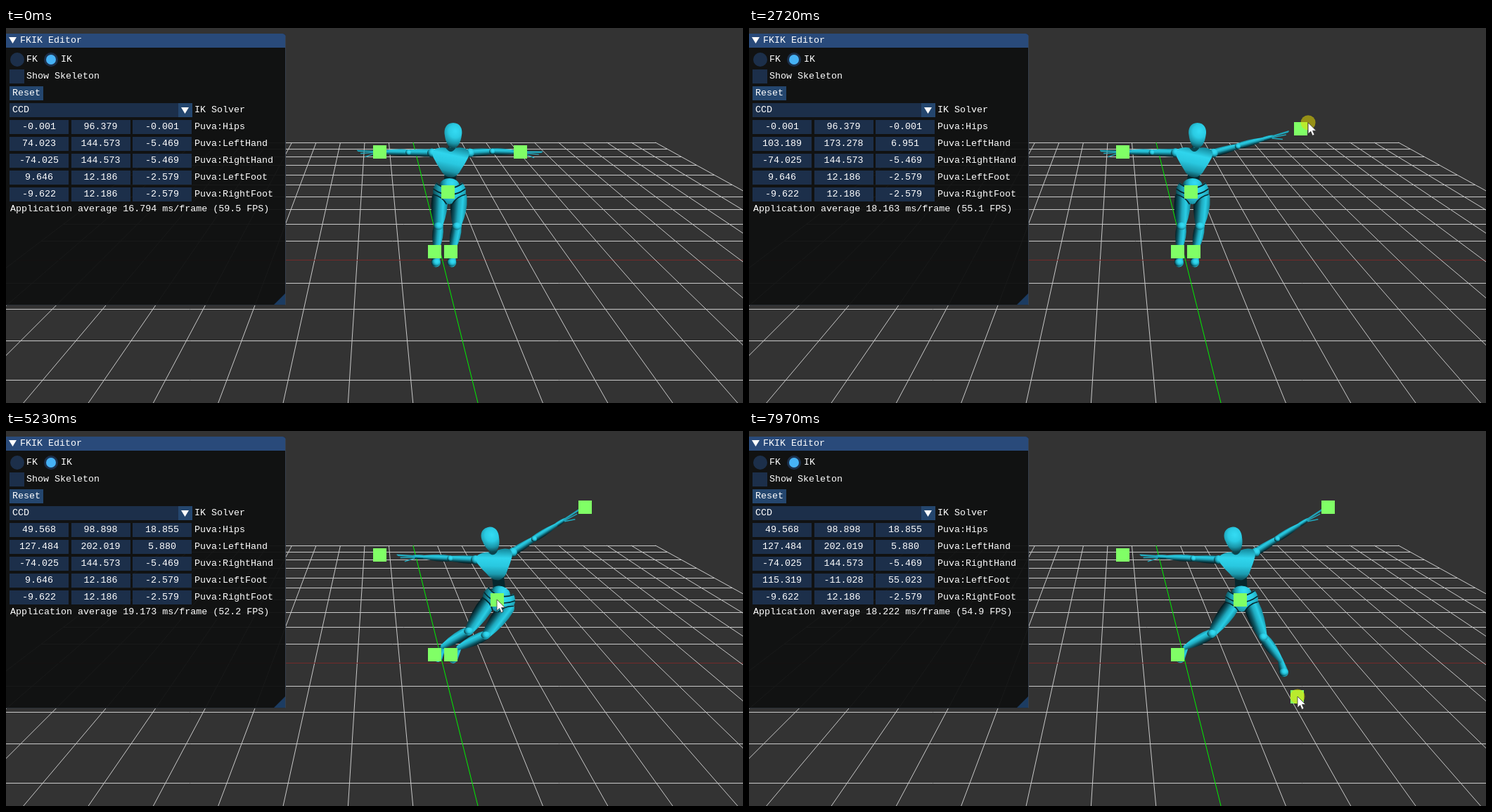
An HTML page with a canvas that plays this animation: 1048x534 px, repeating every 8 s.

```html
<!DOCTYPE html>
<html lang="en">
<head>
<meta charset="utf-8">
<title>FKIK Editor</title>
<style>
html, body { margin: 0; width: 1048px; height: 534px; overflow: hidden; background: #333; }
canvas { position: absolute; left: 0; top: 0; display: block; }
#panel { position: absolute; left: -1px; top: 8px; width: 399px; height: 387px; overflow: hidden;
  background: rgba(15, 16, 16, .95); border-radius: 0 5px 0 0;
  font: 13.35px "Liberation Mono", monospace; color: #fff; }
#panel::after { content: ""; position: absolute; inset: 0; border-right: 1px solid #37404c; border-bottom: 1px solid #2b3036; }
#panel div { position: absolute; white-space: pre; }
.title { background: #294a7a; }
.frame { background: #1c2f4a; text-align: center; }
.button { background: #24466e; text-align: center; }
.round { border-radius: 50%; }
.down { background: #fff; clip-path: polygon(0 0, 100% 0, 50% 100%); }
.dot { background: #46b2f6; border-radius: 50%; }
.grip { background: #1c3c62; clip-path: polygon(100% 0, 100% 100%, 0 100%); }
</style>
</head>
<body>
<canvas id="view" width="1048" height="534"></canvas>
<div id="panel"></div>
<script>
const LOOP = 8000, STEP = 68.75, RAD = Math.PI / 180;
const ctx = document.getElementById('view').getContext('2d');
const panel = document.getElementById('panel');

// Handle paths: [step, screen x, screen y, world x, world y, world z]
const paths = {
  Hips: [[54, 628, 233.5, -.001, 96.379, -.001], [64, 655, 231, 18.122, 103.06, 9.729],
    [75, 698, 240, 49.568, 98.898, 18.855]],
  LeftHand: [[13, 731, 176.5, 74.023, 144.573, -5.469], [28, 696, 224, 48.526, 108.61, 9.36],
    [30, 696, 224, 48.526, 108.61, 9.36], [43, 823.5, 108, 127.484, 202.019, 5.88]],
  RightHand: [[0, 531, 176.5, -74.025, 144.573, -5.469]],
  LeftFoot: [[99, 632, 318, 9.646, 12.186, -2.579], [104, 644.5, 318, 17.564, 17.564, 5.904],
    [114, 779, 378, 115.319, -11.028, 55.023]],
  RightFoot: [[0, 609, 318, -9.622, 12.186, -2.579]]
};
const names = Object.keys(paths);
// Mouse button: pressed and released steps
const drags = [
  { path: paths.LeftHand, from: 12, to: 47 },
  { path: paths.Hips, from: 53, to: 76 },
  { path: paths.LeftFoot, from: 97, to: 117 }
];
const frameMs = [[0, 16.794], [30, 18.979], [53, 16.893], [64, 17.364], [76, 19.173], [104, 17.936], [116, 18.222]];

const mix = (a, b, u) => a.map((v, i) => v + (b[i] - v) * u);

function sample(keys, n) {
  const i = keys.findIndex(k => k[0] > n);
  if (i === 0) return keys[0].slice(1);
  if (i < 0) return keys[keys.length - 1].slice(1);
  const a = keys[i - 1], b = keys[i];
  return mix(a, b, (n - a[0]) / (b[0] - a[0])).slice(1);
}

function add(cls, x, y, w, h, text = '') {
  const el = document.createElement('div');
  el.className = cls;
  el.style.cssText = `left:${x + 1}px;top:${y - 8}px;width:${w}px;height:${h}px;line-height:${h}px`;
  el.textContent = text;
  panel.append(el);
  return el;
}
const label = (x, y, text) => add('', x, y - 10, 380, 20, text);

add('title', -1, 8, 399, 20);
add('down', 4, 13, 11, 9);
label(20, 18, 'FKIK Editor');
add('frame round', 6, 35, 20, 20);
label(29, 45, 'FK');
add('frame round', 54, 35, 20, 20);
add('dot', 57, 38, 14, 14);
label(78, 45, 'IK');
add('frame', 5, 59, 21, 20);
label(29, 69, 'Show Skeleton');
add('button', 5, 83, 48, 20, 'Reset');
add('frame', 5, 107, 259, 20);
label(9, 117, 'CCD');
add('button', 245, 107, 20, 20);
add('down', 249, 113, 11, 9);
label(268, 117, 'IK Solver');
const cells = names.map((name, row) => {
  const y = 131 + row * 24;
  label(268, y + 10, 'Puva:' + name);
  return [0, 1, 2].map(col => add('frame', 5 + col * 87.5, y, 84, 20));
});
const stats = label(6, 258, '');
add('grip', 380, 377, 18, 18);

function line(x1, y1, x2, y2, color) {
  ctx.strokeStyle = color;
  ctx.lineWidth = 1;
  ctx.beginPath();
  ctx.moveTo(x1, y1);
  ctx.lineTo(x2, y2);
  ctx.stroke();
}

// One-point perspective floor
function floor() {
  const eyeY = -57.9, rowY = i => eyeY + 5114 / (13.15 - i);
  const colX = (j, y) => 524 + (y - eyeY) * (.2485 + j * .156);
  const far = rowY(-10);
  for (let k = -10; k <= 10; k++) {
    const y = Math.floor(rowY(k)) + .5;
    line(colX(-10, y), y, colX(10, y), y, k ? '#c9c9c9' : '#742a2a');
    if (k) line(colX(k, far), far, colX(k, 540), 540, '#c9c9c9');
  }
  line(colX(0, far), far, colX(0, 540), 540, '#00f000');
}

function local([x, y], angle, draw) {
  ctx.save();
  ctx.translate(x, y);
  ctx.rotate(angle);
  draw();
  ctx.restore();
}

function offset([x, y], deg, dx, dy) {
  const c = Math.cos(deg * RAD), s = Math.sin(deg * RAD);
  return [x + dx * c - dy * s, y + dx * s + dy * c];
}

function toward(a, b) {
  const dx = b[0] - a[0], dy = b[1] - a[1], len = Math.hypot(dx, dy) || 1;
  return { x: dx / len, y: dy / len, len };
}

function shade(gradient, ...colors) {
  colors.forEach((c, i) => gradient.addColorStop(i / (colors.length - 1), c));
  return gradient;
}
const glow = (x, y, r) => shade(ctx.createRadialGradient(x, y, 1, x, y, r),
  '#33daf2', '#2acbe3', '#1a95a8', '#06333a');

// Tapered limb with a bulge, lit from the upper right
function limb(a, b, ra, bulge, rb) {
  const d = toward(a, b), len = d.len;
  const side = -d.y * .7 - d.x * .7 > 0 ? 1 : -1, r = Math.max(ra, bulge * .8, rb);
  local(a, Math.atan2(d.y, d.x), () => {
    ctx.fillStyle = shade(ctx.createLinearGradient(0, -side * r, 0, side * r),
      '#031a1f', '#0d5663', '#1fa9be', '#2aceE6', '#1791a5');
    ctx.beginPath();
    ctx.moveTo(0, -ra);
    ctx.quadraticCurveTo(len * .4, -bulge, len, -rb);
    ctx.arc(len, 0, rb, -Math.PI / 2, Math.PI / 2);
    ctx.quadraticCurveTo(len * .4, bulge, 0, ra);
    ctx.arc(0, 0, ra, Math.PI / 2, Math.PI * 1.5);
    ctx.fill();
  });
}

function ball(p, rx, ry = rx, deg = 0) {
  local(p, deg * RAD, () => {
    ctx.fillStyle = glow(rx * .25, -ry * .35, Math.max(rx, ry) * 1.3);
    ctx.beginPath();
    ctx.ellipse(0, 0, rx, ry, 0, 0, Math.PI * 2);
    ctx.fill();
  });
}

function hand(wrist, d, side) {
  const len = 40;
  limb(wrist, [wrist[0] + d.x * 15, wrist[1] + d.y * 15], 2.6, 4, 2.4);
  local(wrist, Math.atan2(d.y, d.x), () => {
    ctx.strokeStyle = '#20a9be';
    ctx.lineWidth = 1.4;
    for (let i = 0; i < 4; i++) {
      ctx.beginPath();
      ctx.moveTo(14, (i - 1) * side);
      ctx.lineTo(len - i * i * 1.3, (i * i - 1.5) * side);
      ctx.stroke();
    }
  });
}

// The wrist reaches for its handle; slack bends the elbow
function arm(shoulder, handle, side) {
  const d = toward(shoulder, handle), reach = Math.min(d.len - 8, 72);
  const wrist = [shoulder[0] + d.x * reach, shoulder[1] + d.y * reach];
  const bend = side * .4 * Math.sqrt(Math.max(0, 32 ** 2 - reach ** 2 / 4));
  const elbow = [shoulder[0] + d.x * reach / 2 + d.y * bend, shoulder[1] + d.y * reach / 2 - d.x * bend];
  hand(wrist, toward(elbow, wrist), side);
  limb(elbow, wrist, 4.2, 6, 2.7);
  limb(shoulder, elbow, 5.5, 6.3, 3.8);
  ball(elbow, 4);
  ball(shoulder, 6.5);
}

function leg(hip, handle) {
  const d = toward(hip, [handle[0] + 3, handle[1] - 2]), reach = Math.min(d.len, 88);
  const ankle = [hip[0] + d.x * reach, hip[1] + d.y * reach], bend = -14 * d.x;
  const knee = [hip[0] + d.x * reach * .54 + d.y * bend, hip[1] + d.y * reach * .54 - d.x * bend];
  const f = toward([0, 0], [d.x, d.y + .8]);
  const toe = [ankle[0] + f.x * 18, ankle[1] + f.y * 18];
  limb(ankle, toe, 3.6, 5, 6.6);
  ball(toe, 6.4, 5.6);
  limb(knee, ankle, 6.5, 10, 3.6);
  limb(hip, knee, 11, 13.5, 6);
  ball(knee, 6.8, 5.2);
}

// Outline of the right half, mirrored to the left
function mirrored(half) {
  const path = new Path2D(half), whole = new Path2D(path);
  whole.addPath(path, new DOMMatrix([-1, 0, 0, 1, 0, 0]));
  return whole;
}
const chestPath = mirrored('M0 -14L6 -19Q14 -21 22 -18Q28 -15 25 -6Q20 4 15 11Q10 22 0 23Z');
const pelvisPath = mirrored('M0 -6Q11 -7 18 -14Q25 -6 23 2Q10 6 4 16L0 17Z');
const headPath = mirrored('M0 -18C10 -18 14 -9 12 0C11 8 8 17 0 19Z');

function chestShape() {
  ctx.fillStyle = shade(ctx.createLinearGradient(5, -20, -5, 25),
    '#1791a5', '#2fd5ed', '#29c8e0', '#1b9aae', '#05282e');
  ctx.fill(chestPath);
  ctx.fillStyle = '#0a444e';
  ctx.fill(new Path2D('M-7 -19Q0 -9 7 -19Z'));
}

function pelvisShape() {
  ctx.fillStyle = glow(5, -5, 31);
  ctx.fill(pelvisPath);
  ctx.strokeStyle = '#06282e';
  ctx.lineWidth = 1.6;
  ctx.stroke(new Path2D('M-19 -13Q0 1 19 -13M-23 -5Q0 12 23 -5M-23 3Q-10 6 -4 17M23 3Q10 6 4 17'));
}

function headShape() {
  ctx.fillStyle = glow(3, -6, 26);
  ctx.fill(headPath);
}

// The whole pose follows from the handle positions
function figure(at) {
  const { Hips, LeftHand, RightHand, LeftFoot, RightFoot } = at;
  const pelvis = [Hips[0] + 2.5, Hips[1] + .5], shift = Hips[0] - 628;
  const sway = .22 * (pelvis[0] - (LeftFoot[0] + RightFoot[0]) / 2 - 10);
  const strain = toward([pelvis[0] + 29, pelvis[1] - 56], LeftHand).len - 128;
  const lean = Math.max(0, strain) * .65 - shift * .1;
  const tilt = lean * .42 - shift * .12;
  const chest = offset([pelvis[0] + 2, pelvis[1]], lean, 0, -44 - shift * .1);
  const glance = Math.max(-4, Math.min(4, (LeftHand[0] - 714) / 5));
  const head = offset([chest[0] + glance, chest[1]], tilt * 1.5, 0, -37);
  const shoulders = [-1, 1].map(side => offset(chest, tilt, side * 27, -12));
  const swing = Math.max(0, lean - 15) * 1.2;
  const aim = offset(shoulders[0], swing, RightHand[0] - shoulders[0][0], RightHand[1] - shoulders[0][1]);

  leg(offset(pelvis, sway, -14, 8), RightFoot);
  leg(offset(pelvis, sway, 14, 8), LeftFoot);
  ctx.strokeStyle = '#06272d';
  ctx.lineWidth = 17;
  ctx.beginPath();
  ctx.moveTo(...offset(chest, tilt, 0, 14));
  ctx.lineTo(...offset(pelvis, sway, 0, -8));
  ctx.stroke();
  ball(offset(pelvis, sway, 0, -10), 14, 10, sway);
  local(pelvis, sway * RAD, pelvisShape);
  limb(offset(chest, tilt, 0, -14), offset(head, tilt, 0, 12), 6, 5, 5);
  arm(shoulders[0], aim, -1);
  arm(shoulders[1], LeftHand, 1);
  local(chest, tilt * RAD, chestShape);
  local(head, tilt * 1.4 * RAD, headShape);
}

// The pointer leads the handle it drags and glides between drags
function pointer(n) {
  if (n < 1) return;
  const next = drags.findIndex(d => n < d.to), drag = drags[next], pressed = n >= drag.from;
  let [x, y] = sample(drag.path, n + 1);
  if (!pressed) {
    const prev = drags[next - 1], left = prev ? prev.to : 1;
    const origin = prev ? sample(prev.path, n) : [968, 514];
    const u = Math.min(1, (n - left) / Math.min(10, drag.from - left - 1));
    [x, y] = mix(origin.slice(0, 2), [x + 4, y], u);
  } else {
    x += 1;
    ctx.fillStyle = 'rgba(232,220,0,.55)';
    ctx.beginPath();
    ctx.arc(x, y, 10.5, 0, Math.PI * 2);
    ctx.fill();
  }
  local([x, y], 0, () => {
    const arrow = new Path2D('M0 0V16L3.7 12.5L6.2 18.5L9 17.3L6.5 11.5H11.5Z');
    ctx.fillStyle = '#fff';
    ctx.strokeStyle = '#333';
    ctx.lineWidth = .8;
    ctx.fill(arrow);
    ctx.stroke(arrow);
  });
}

function put(el, text) {
  if (el.textContent !== text) el.textContent = text;
}

function render(now) {
  const n = Math.floor((now % LOOP + 6) / STEP), at = {};
  for (const name of names) at[name] = sample(paths[name], n);
  ctx.fillStyle = '#333';
  ctx.fillRect(0, 0, 1048, 534);
  floor();
  figure(at);
  names.forEach((name, row) => {
    const [x, y, ...world] = at[name];
    ctx.fillStyle = '#80ff66';
    ctx.fillRect(Math.round(x - 9.5), Math.round(y - 9.5), 19, 19);
    world.forEach((v, i) => put(cells[row][i], v.toFixed(3)));
  });
  pointer(n);
  const [ms] = sample(frameMs, n);
  put(stats, `Application average ${ms.toFixed(3)} ms/frame (${(1000 / ms).toFixed(1)} FPS)`);
}

const start = performance.now();
function tick() {
  render(performance.now() - start);
  requestAnimationFrame(tick);
}
tick();
</script>
</body>
</html>
```
